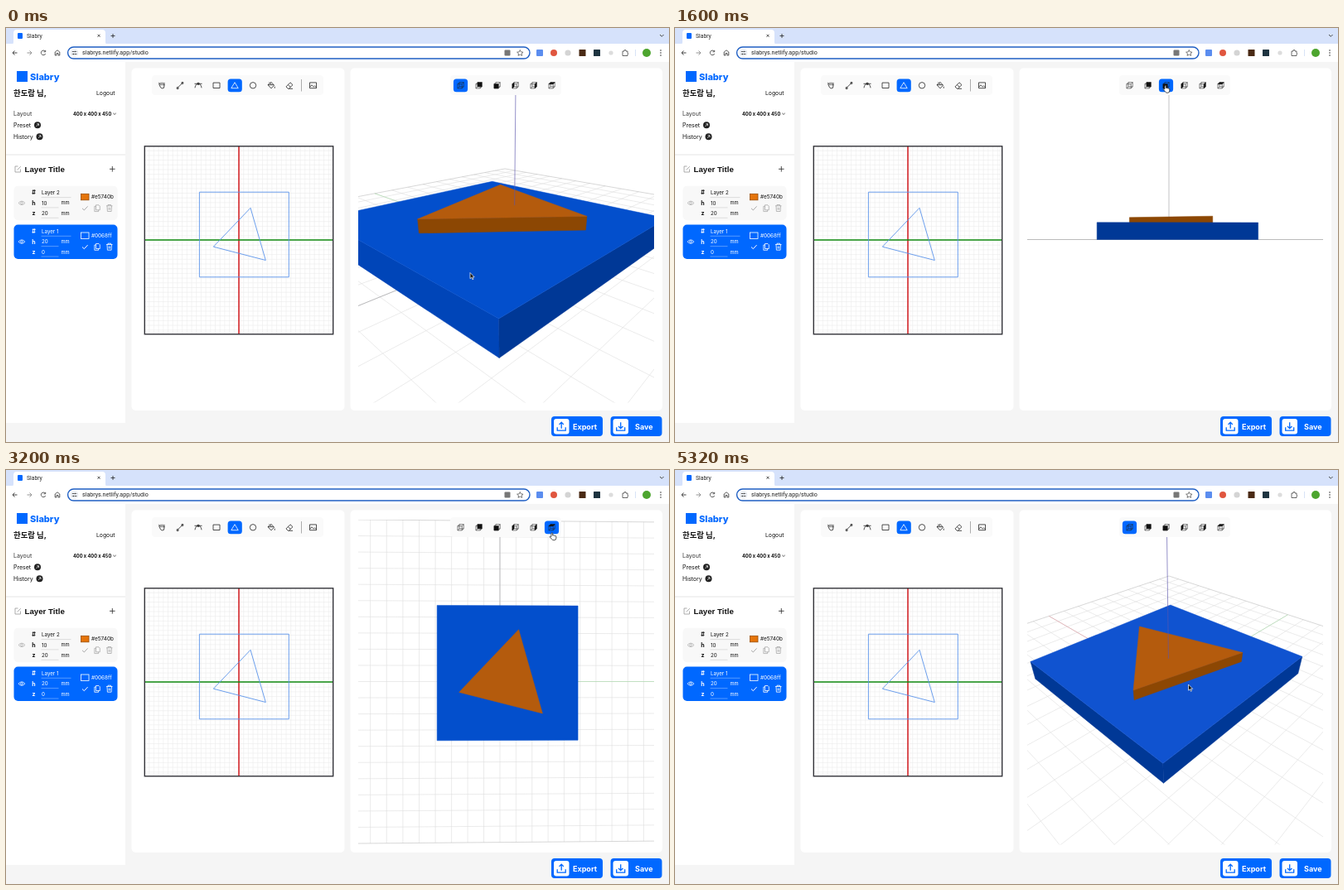
These frames come from a looping animation (800 by 500 pixels, 5440 ms). An HTML page:

```html
<!DOCTYPE html>
<html lang="en">
<head>
<meta charset="utf-8">
<title>Slabry studio</title>
<style>
html, body { margin: 0; width: 100%; height: 100%; overflow: hidden; background: #f5f5f5; }
svg { display: block; width: 800px; height: 500px; }
text { font-family: Inter, "Noto Sans CJK KR", sans-serif; white-space: pre; }
</style>
</head>
<body>
<svg id="stage" viewBox="0 0 800 500" xmlns="http://www.w3.org/2000/svg">
  <defs><clipPath id="view"><rect x="425" y="60" width="357" height="392.5"/></clipPath></defs>
  <g id="base"></g>
  <g id="scene" clip-path="url(#view)"></g>
  <g id="bar"></g>
  <g id="pointer" stroke-linejoin="round">
    <path id="arrow" d="M0 0V7.2L1.7 5.7L2.9 8.3L4 7.8L2.9 5.3H5.2Z" fill="#111" stroke="#fff" stroke-width=".7"/>
    <path id="hand" d="M0 1Q.9 -.4 1.7 .9V3.6Q2.5 2.9 3.2 3.8Q4 3.3 4.6 4.1Q5.8 3.8 5.8 5V7Q5.6 9.2 3.3 9.3Q1.3 9.3 .4 7.8L-1.9 5.2Q-1.6 4 -.2 5Z" fill="#fff" stroke="#222" stroke-width=".8"/>
  </g>
</svg>
<script>
const BLUE = '#0068ff', INK = '#222';
const $ = id => document.getElementById(id);

// ---- drawing helpers ----
const rect = (x, y, w, h, fill, r = 0, more = '') =>
  `<rect x="${x}" y="${y}" width="${w}" height="${h}" rx="${r}" fill="${fill}" ${more}/>`;
const dot = (x, y, r, fill, more = '') => `<circle cx="${x}" cy="${y}" r="${r}" fill="${fill}" ${more}/>`;
const path = (d, stroke = INK, w = .8, fill = 'none', more = '') =>
  `<path d="${d}" stroke="${stroke}" stroke-width="${w}" fill="${fill}" ${more}/>`;
const text = (x, y, s, size, fill = '#111', weight = 400, more = '') =>
  `<text x="${x}" y="${y}" font-size="${size}" fill="${fill}" font-weight="${weight}" ${more}>${s}</text>`;
const at = (x, y, s) => `<g transform="translate(${x} ${y})">${s}</g>`;

// ---- static parts ----
function browser() {
  const roboto = 'style="font-family:Roboto,sans-serif"';
  return rect(0, 0, 800, 20, '#d6e2fb') + rect(0, 19, 800, 22, '#fff') +
    path('M6 20Q9 20 9 17V6Q9 2 13 2H116Q120 2 120 6V17Q120 20 123 20Z', 'none', 0, '#fff') +
    rect(14, 6, 6, 7, BLUE, 1) + text(25, 12, 'Slabry', 6.8, INK, 400, roboto) +
    path('M110.5 7.8L113.5 10.8M113.5 7.8L110.5 10.8M126.5 9.5H131.5M129 7V12M789 8L791.3 10.3L793.6 8') +
    path('M13.5 30H8M10.5 27.5L8 30L10.5 32.5', '#333', .9) +
    path('M25.5 30H31M28.5 27.5L31 30L28.5 32.5', '#888', .9) +
    path('M47.2 28A2.8 2.8 0 1 0 47.7 31M47.7 26.8V28.8H45.6M59.2 33V29L62 26.8L64.8 29V33H63V30.5H61V33Z', '#333') +
    rect(74.6, 23, 557.4, 14, '#fff', 7, 'stroke="#1f5fc4" stroke-width="1.4"') +
    dot(82.5, 30, 5, '#eef1f6') +
    path('M79.8 28.5H82.5M84.5 28.5H85.4M79.8 31.5H80.7M82.8 31.5H85.4', '#333') +
    dot(83.4, 28.5, .8, '#333') + dot(81.6, 31.5, .8, '#333') +
    text(92, 32.4, 'slabrys.netlify.app/studio', 7.1, INK, 400, roboto) +
    rect(601.5, 26.5, 7, 7, '#777', 1) +
    path('M620.3 26.5L621.4 28.9L624 29.2L622.1 30.9L622.6 33.4L620.3 32.1L618 33.4L618.5 30.9L616.6 29.2L619.2 28.9Z', '#444', .7) +
    rect(640, 26, 8, 8, '#5b8def', 1) + dot(661, 30, 4, '#e0563f') + dot(678, 30, 3.6, '#d4d4d4') +
    rect(691.5, 26, 8, 8, '#4a2a14', .5) + rect(709, 26, 8, 8, '#1e3440', .5) + dot(730, 30, 2.6, '#dcdcdc') +
    path('M744 28H746V27Q747 25.5 748 27V28H750V30Q751.5 31 750 32V33.5H744Z', '#444') +
    path('M759.5 26V34', '#cfdcf5') + dot(773, 30, 5, '#4da52f') +
    [27, 30, 33].map(y => dot(790, y, .8, '#333')).join('');
}

function card(y, name, depth, height, color, label, active) {
  const ink = active ? '#fff' : '#111', soft = active ? '#fff' : '#aaa', line = active ? '#8dbbff' : '#ccc';
  const row = (dy, key, value, w) =>
    text(33.5, dy + 2.4, key, 7, ink, 700, 'text-anchor="middle"') + text(43, dy + 2.2, value, 6.2, ink) +
    path(`M42.5 ${dy + 5.5}h${w}`, line, .6);
  return at(0, y,
    rect(9.5, 0, 125, 41.5, active ? BLUE : '#f8f8f8', 5) +
    row(8.3, '#', name, 36) + row(20.6, 'h', height, 21) + row(33, 'z', depth, 21) +
    text(66.5, 22.6, 'mm', 5.8, ink) + text(66.5, 35, 'mm', 5.8, ink) +
    rect(90.5, 9.5, 9.5, 7.5, color, 0, `stroke="${active ? '#fff' : '#9a4f0a'}" stroke-width=".8"`) +
    text(103, 15.5, label, 6.4, ink) +
    path('M15 20.6Q19 16 23 20.6Q19 25 15 20.6Z', soft, .7) + dot(19, 20.6, 1.4, 'none', `stroke="${soft}" stroke-width=".7"`) +
    path('M92 27L94.3 29.2L98.6 24.6', soft, 1) +
    path('M108.5 23H112L113.3 24.3V29H108.5ZM108.5 24.5H106.8V30.8H111.6V29', soft) +
    path('M121 24H128.5M123 24V22.7H126.5V24M122 24L122.4 30.7H127.1L127.5 24M124 26V29M125.6 26V29', soft));
}

function sidebar() {
  const link = (x, y) => dot(x, y, 4, INK) +
    path(`M${x - 1.6} ${y + 1.6}L${x + 1.5} ${y - 1.5}M${x - .8} ${y - 1.5}H${x + 1.5}V${y + .8}`, '#fff', .7);
  return rect(0, 41, 144, 436, '#fff') + rect(0, 152, 144, 2, '#f2f2f2') +
    rect(13, 52, 13, 13, BLUE) + text(29, 62.5, 'Slabry', 11, BLUE, 800) +
    text(9, 81.9, '한도람 님,', 9.4, '#111', 700) + text(109, 81.3, 'Logout', 6.8) +
    text(9, 106.3, 'Layout', 7, '#333') + text(81, 105.5, '400 x 400 x 450', 5.7, '#111', 700) +
    path('M129.2 102.8L131 104.5L132.8 102.8', INK, .7) +
    text(9, 120.3, 'Preset', 7) + link(38, 117.3) + text(9, 134.2, 'History', 7) + link(40.5, 131.3) +
    path('M14.5 167H11V174H17.5V170.5M13.5 171.5L17.8 167.2', '#999', .8) +
    text(22.5, 173.8, 'Layer Title', 9.7, '#111', 700, 'style="font-family:\'Liberation Sans\',sans-serif"') +
    path('M125 170.3H131.6M128.3 167V173.6') +
    card(190.8, 'Layer 2', '20', '10', '#e5740b', '#e5740b', false) +
    card(237.5, 'Layer 1', '0', '20', BLUE, '#0068ff', true);
}

function tools() {
  const icons = [
    [188, 'M-3.5 -2L-1.5 2.5Q0 4.5 2.5 3L3.2 -1.5M-3.5 -3.5L-2 -1.2M-1 -3.6V0M1 -3.6V0M3 -3.4L2.5 0'],
    [210, 'M-3 3L3 -3M-3.8 2.4h1.8v1.8h-1.8ZM2 -3.8h1.8v1.8h-1.8Z'],
    [232, 'M-4 3Q-3.4 -1.8 0 -1.8Q3.4 -1.8 4 3M-4.5 -2H4.5M-1 -3h2v2h-2Z'],
    [254, 'M-4 -3.2H4V3.2H-4Z'],
    [276, 'M0 -3.6L4.2 3.4H-4.2Z'],
    [298, 'M-3.7 0A3.7 3.7 0 1 0 3.7 0A3.7 3.7 0 1 0 -3.7 0'],
    [320, 'M-4 -.6L0 -4L3.5 0L0 3.6ZM-4 -.6H3.2M4.2 1.4V3.5M-2.4 -3.8L.3 -1'],
    [342, 'M-4 1.6L1 -3.5L4 -.6L-.8 4H-1.8ZM-1.7 -.7L1.4 2.2M-.8 4H4'],
    [370.5, 'M-4 -3.4H4V3.4H-4ZM-4 2L-1.4 -.5L.8 1.8L2 .7L4 2.4']];
  return rect(176, 57, 207, 24, '#fafafa', 4) + rect(267.6, 61.5, 17.2, 15.8, BLUE, 3.5) + path('M356.5 62V76.5', '#999') +
    icons.map(([x, d]) => at(x, 69.3, path(d, x === 276 ? '#fff' : INK))).join('');
}

function plan() {
  let grid = '';
  for (let i = 1; i < 40; i++) grid += `M${167 + i * 5.7} 143V370M167 ${142.5 + i * 5.7}H395`;
  return path(grid, '#ebebeb', .6) +
    path('M281 143V370', '#d0191c', 1.5) + path('M167 256H395', '#118a11', 1.5) +
    path('M233.4 198.2H341.3V300.8H233.4ZM295 217.3L250.3 264.2L313.3 280.5Z', '#5b93ea', .9) +
    rect(167.3, 142.8, 227.4, 227, 'none', 0, 'stroke="#34343a" stroke-width="1.4"');
}

function action(x, label, tx, icon) {
  return rect(x, 469, 62, 24, BLUE, 4) + rect(x + 3, 472, 18.5, 18.5, '#fff', 3) +
    at(x + 12.2, 481.2, path('M-5 1V5H5V1' + icon, BLUE, 1.3)) + text(tx, 484.6, label, 9, '#fff', 700);
}

$('base').innerHTML = rect(0, 0, 800, 500, '#f5f5f5') + browser() + sidebar() +
  rect(151.5, 48.5, 257, 413.5, '#fff', 5) + rect(415.5, 48.5, 376.5, 413.5, '#fff', 5) +
  tools() + plan() +
  action(658, 'Export', 684, 'M0 2.5V-5M-2.7 -2.3L0 -5L2.7 -2.3') +
  action(729.5, 'Save', 759, 'M0 -5V2.5M-2.7 -.2L0 2.5L2.7 -.2');

// ---- view buttons ----
const buttonX = i => 548.5 + i * 22;
const faces = ['', 'M-1.6 -3.8H4V1.8H-1.6Z', 'M-3.8 -1.6H1.8V4H-3.8Z', 'M-3.8 -1.6L-1.6 -3.8V1.8L-3.8 4Z',
  'M1.8 -1.6L4 -3.8V1.8L1.8 4Z', 'M-3.8 -1.6L-1.6 -3.8H4L1.8 -1.6Z'];
const cube = 'M-3.8 -1.6H1.8V4H-3.8ZL-1.6 -3.8H4L1.8 -1.6M4 -3.8V1.8L1.8 4M-1.6 -3.8V1.8H4M-1.6 1.8L-3.8 4';

function viewBar(active, hover) {
  return rect(536, 57, 134, 24, '#fafafa', 4) + faces.map((d, i) =>
    (i === active || i === hover ? rect(buttonX(i) - 8.6, 61.5, 17.2, 15.8, BLUE, 3.5) : '') +
    at(buttonX(i), 69.2, `<g transform="scale(.93)">${path(cube, '#222', .6) + (d && path(d, '#111', .4, '#111'))}</g>`)).join('');
}

// ---- 3D view ----
const FOCAL = 421, MID = [603.5, 255.5], HALF = 225, TARGET = [8.7, 0, 0];
const SLAB = [[-84, -79], [105, -79], [105, 102], [-84, 102]];
const WEDGE = [[24.6, 68.4], [-53.5, -14], [56, -42]];
const sub = (a, b) => a.map((v, i) => v - b[i]);
const dotp = (a, b) => a[0] * b[0] + a[1] * b[1] + a[2] * b[2];
const cross = (a, b) => [a[1] * b[2] - a[2] * b[1], a[2] * b[0] - a[0] * b[2], a[0] * b[1] - a[1] * b[0]];
const unit = a => a.map(v => v / Math.hypot(...a));
const MIRROR = unit([-1, -1, 1]);  // where the light from +x +y is reflected by a top face

function orbit(azimuth, elevation, d) {
  const a = azimuth * Math.PI / 180, e = elevation * Math.PI / 180;
  return [TARGET[0] + d * Math.cos(e) * Math.cos(a), d * Math.cos(e) * Math.sin(a), d * Math.sin(e)];
}

function draw3d(eye, up) {
  const f = unit(sub(TARGET, eye)), r = unit(cross(f, up)), u = cross(r, f);
  const local = p => { const q = sub(p, eye); return [dotp(q, r), dotp(q, u), dotp(q, f)]; };
  const screen = q => (MID[0] + FOCAL * q[0] / q[2]).toFixed(2) + ' ' + (MID[1] - FOCAL * q[1] / q[2]).toFixed(2);
  const project = p => screen(local(p));
  const seg = (a, b) => {
    let p = local(a), q = local(b);
    const near = 4;
    if (p[2] < near && q[2] < near) return '';
    const cut = (s, t) => s.map((v, i) => v + (t[i] - v) * (near - s[2]) / (t[2] - s[2]));
    if (p[2] < near) p = cut(p, q);
    if (q[2] < near) q = cut(q, p);
    return `M${screen(p)}L${screen(q)}`;
  };
  const poly = (pts, fill) => path('M' + pts.map(project).join('L') + 'Z', fill, .5, fill, 'stroke-linejoin="round"');
  const prism = (base, z0, z1, top, shade) => {
    let out = '';
    base.forEach(([x, y], i) => {
      const [X, Y] = base[(i + 1) % base.length], nx = Y - y, ny = x - X;
      if (nx * (eye[0] - x) + ny * (eye[1] - y) > 0)
        out += poly([[x, y, z0], [X, Y, z0], [X, Y, z1], [x, y, z1]], shade(nx, ny));
    });
    return eye[2] > z1 ? out + poly(base.map(p => [...p, z1]), top) : out;
  };

  let grid = '', rim = '';
  for (let i = 0; i <= 20; i++) {
    const k = -HALF + i * HALF / 10;
    const d = seg([k, -HALF, 0], [k, HALF, 0]) + seg([-HALF, k, 0], [HALF, k, 0]);
    if (i % 20) grid += d; else rim += d;
  }
  const flat = eye[2] < 1, high = eye[2] > 30;
  const floor = flat ? path('M425 255.5H782', '#aaa', .8) :
    path(grid, '#dedede', .6) + path(rim, '#bdbdbd', .6) +
    path(seg([0, 0, 0], [HALF, 0, 0]), '#a5d8a5', .6) +
    path(seg([0, 0, 0], [0, HALF, 0]), eye[1] < 0 ? '#dfa3a8' : '#a5a5a8', .7);
  const pole = path(seg([0, 0, high ? 30 : 0], [0, 0, HALF]), flat ? '#a2a2a6' : '#5c55ac', .65);
  const gloss = Math.max(0, dotp(unit(eye), MIRROR)) ** 6;
  const top = `rgb(${3 + 13 * gloss},${79 + 4 * gloss},${204 + 4 * gloss})`;
  const slab = prism(SLAB, 0, 20, top, (nx, ny) => nx + ny > 0 ? '#0045b8' : '#003896');
  const wedge = prism(WEDGE, 20, 30, '#b45b0d', () => '#8c4703');
  return floor + (high ? slab + wedge + (up[1] ? '' : pole) : pole + wedge + slab);
}

// ---- timeline ----
const LOOP = 5440, ISO = 35.26, D = 488;
const clicks = [[0, 0], [700, 1], [1300, 2], [1900, 3], [2700, 4], [3200, 5], [4100, 0]];
const moves = [[0, 560, 295.5], [600, 568.5, 67], [1100, 568.5, 67], [1300, 591, 69], [1600, 591, 69], [1800, 613, 70],
  [2100, 613, 70], [2400, 633.5, 71], [2700, 633.5, 71], [3000, 658, 75.5], [3500, 658, 75.5], [3900, 547.5, 71.5],
  [4100, 547.5, 71.5], [4500, 619, 253], [4800, 619, 253], [5000, 619.5, 259], [LOOP, 619.5, 259]];
// time, distance (eased as a logarithm), azimuth
const zoom = [[0, 853, 225], [4500, 853, 225], [4800, 627, 224.8], [5320, 340, 224.2], [LOOP, 340, 224.2]]
  .map(([t, d, a]) => [t, Math.log(d), a]);
const smooth = k => k * k * (3 - 2 * k);

function track(keys, t, ease = k => k) {
  const i = Math.max(1, keys.findIndex(k => k[0] > t));
  const [a, b] = [keys[i - 1], keys[i]], k = ease((t - a[0]) / (b[0] - a[0]));
  return a.slice(1).map((v, j) => v + (b[j + 1] - v) * k);
}

function camera(view, t) {
  if (t < 700) return orbit(133.5, 21.7, 278);
  const [logD, azimuth] = track(zoom, t);
  return [orbit(azimuth, ISO, Math.exp(logD)), [0, D, 0], [0, -D, 0], [-D, 0, 0], [D, 0, 0], [0, 0, D]][view];
}

function render(ms) {
  const t = ms >= 5320 ? 5320 : Math.min(5200, Math.floor(ms / 100) * 100);
  const view = clicks.filter(c => c[0] <= t).pop()[1];
  const [x, y] = track(moves, t, smooth);
  const near = Math.round((x - buttonX(0)) / 22);
  const hover = y > 60 && y < 78 && Math.abs(x - buttonX(near)) < 9 ? near : -1;
  $('scene').innerHTML = draw3d(camera(view, t), view === 5 ? [0, 1, 0] : [0, 0, 1]);
  $('bar').innerHTML = viewBar(view, hover);
  $('pointer').setAttribute('transform', `translate(${x} ${y})`);
  $('hand').style.display = hover < 0 ? 'none' : '';
  $('arrow').style.display = hover < 0 ? '' : 'none';
}

const start = performance.now();
function tick() {
  render((performance.now() - start) % LOOP);
  requestAnimationFrame(tick);
}
tick();
</script>
</body>
</html>
```
